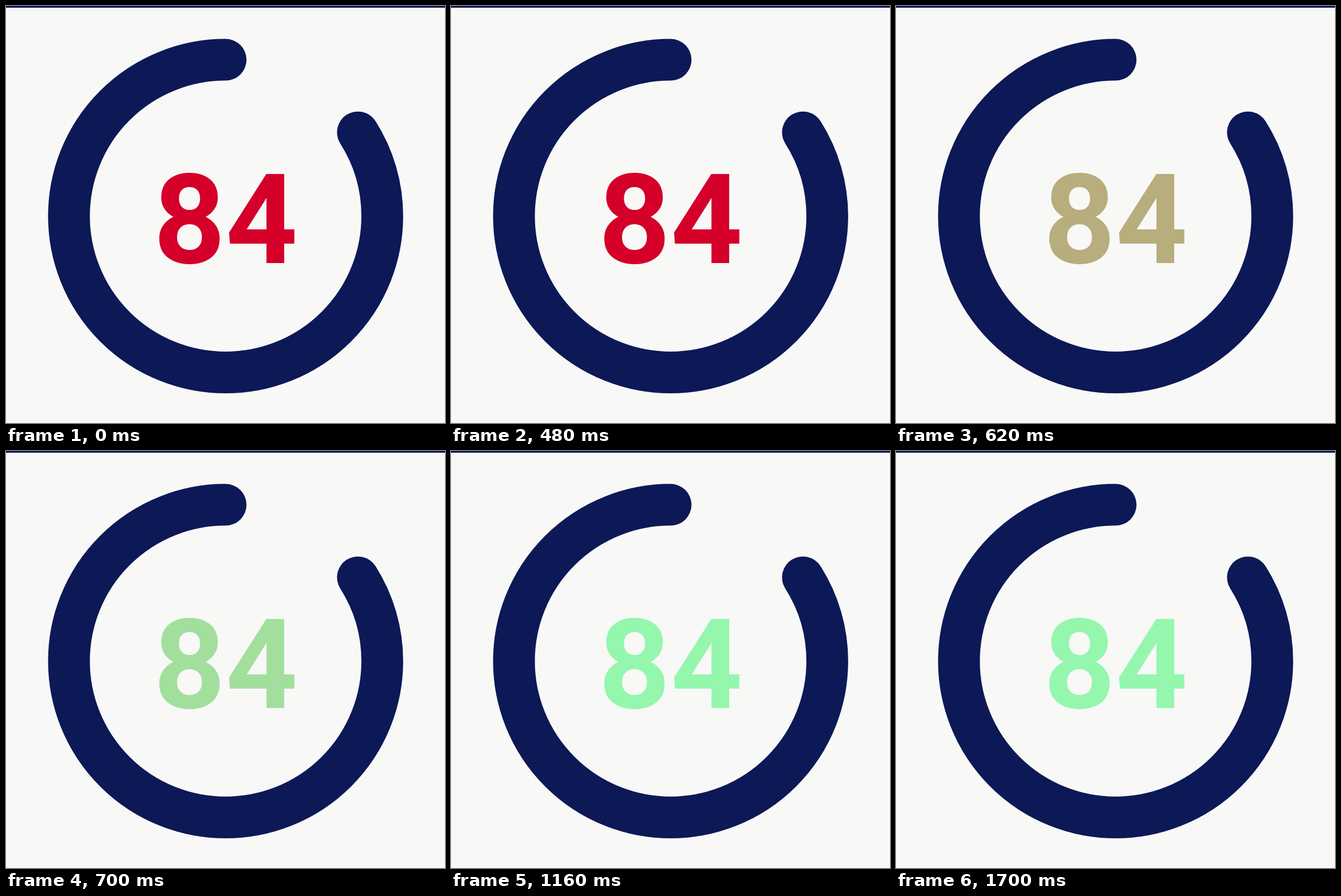
An HTML page with a canvas for the animation above (1720 ms loop, 767x730 px).

```html
<!DOCTYPE html>
<html lang="en">
<head>
<meta charset="utf-8">
<title>Score ring</title>
<style>
  html, body { margin: 0; width: 100%; height: 100%; overflow: hidden; background: #f8f8f7; }
  canvas { display: block; }
</style>
</head>
<body>
<canvas id="stage" width="767" height="730"></canvas>
<script>
const ctx = document.getElementById('stage').getContext('2d');
const LOOP = 1720;
const SCORE = 84;
const NAVY = '#0d1856';
const RED = [212, 0, 42];
const GREEN = [148, 247, 173];
const FADE_START = 508;
const CX = 383.7, CY = 367.8, RADIUS = 273.7, WIDTH = 73;

// Lightly bouncing spring, settling visually in 0.4 s.
function spring(ms) {
  if (ms <= 0) return 0;
  const zeta = 0.8;
  const tau = ms / 1000 * 2 * Math.PI / (0.4 * 1.2);
  const k = Math.sqrt(1 - zeta * zeta);
  return 1 - Math.exp(-zeta * tau) * (Math.cos(k * tau) + zeta / k * Math.sin(k * tau));
}

// Blend on squared channels, so midtones stay bright.
function mix(a, b, p) {
  const rgb = a.map((v, i) => {
    const sq = v * v + p * (b[i] * b[i] - v * v);
    return Math.round(Math.min(255, Math.sqrt(Math.max(0, sq))));
  });
  return `rgb(${rgb})`;
}

function drawRing() {
  const top = -Math.PI / 2;
  ctx.strokeStyle = NAVY;
  ctx.lineWidth = WIDTH;
  ctx.lineCap = 'round';
  ctx.beginPath();
  ctx.arc(CX, CY, RADIUS, top, top - SCORE / 100 * 2 * Math.PI, true);
  ctx.stroke();
}

function draw(t) {
  ctx.fillStyle = '#f8f8f7';
  ctx.fillRect(0, 0, 767, 730);
  ctx.fillStyle = NAVY;
  ctx.fillRect(0, 0, 767, 3);
  drawRing();
  ctx.fillStyle = mix(RED, GREEN, spring(t - FADE_START));
  ctx.font = '700 219.4px Roboto, sans-serif';
  ctx.textAlign = 'center';
  ctx.textBaseline = 'alphabetic';
  ctx.fillText(SCORE, CX, 450);
}

const start = performance.now();
function frame() {
  draw((performance.now() - start) % LOOP);
  requestAnimationFrame(frame);
}
frame();
</script>
</body>
</html>
```
